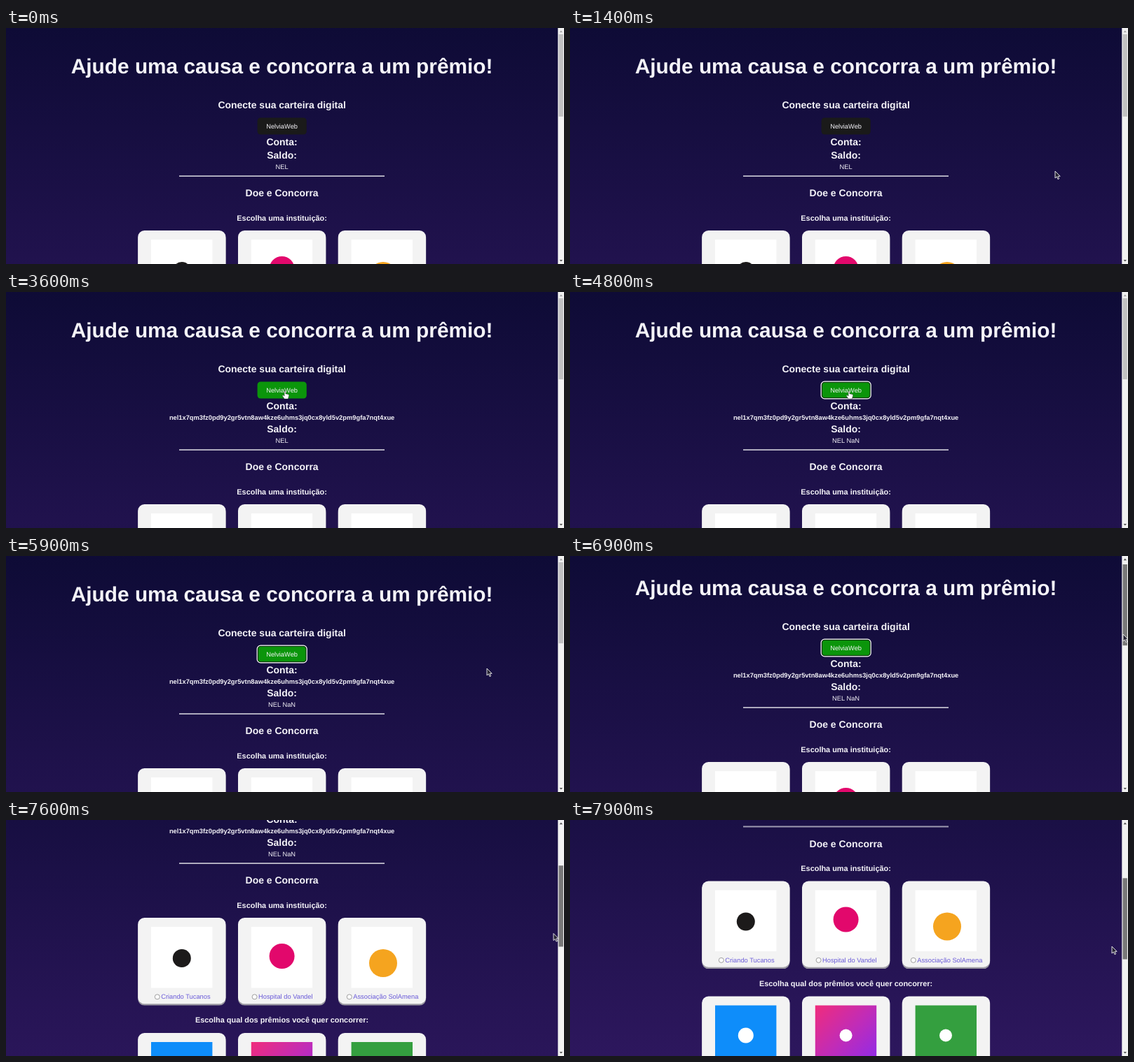
An HTML page for the animation above (8 s loop, 796 px wide and 338 px high).

```html
<!DOCTYPE html>
<html lang="pt-BR">
<head>
<meta charset="utf-8">
<title>Ajude uma causa</title>
<style>
  html, body { margin: 0; width: 100%; height: 100%; overflow: hidden; background: #0e0b36; }
  svg { display: block; width: 796px; height: 338px; }
  text { font-family: "Liberation Sans", Arial, sans-serif; fill: #f4f3f8; text-rendering: geometricPrecision; }
  .h1, .h2, .h3, .b { font-weight: bold; text-anchor: middle; }
  .h1 { font-size: 29.84px; }
  .h2 { font-size: 13.98px; }
  .h3 { font-size: 10.91px; }
  .b, .p, .label { font-size: 9.32px; }
  .p { text-anchor: middle; }
  .label { fill: #6a5bd8; }
</style>
</head>
<body>
<svg viewBox="0 0 796 338">
  <defs>
    <linearGradient id="night" x2="0" y2="1">
      <stop stop-color="#0e0b36"/><stop offset="1" stop-color="#421f78"/>
    </linearGradient>
    <linearGradient id="pink" x2="1" y2="1">
      <stop stop-color="#f02c7c"/><stop offset=".5" stop-color="#c02cb8"/><stop offset="1" stop-color="#8a2bee"/>
    </linearGradient>
  </defs>

  <g id="page">
    <rect width="788" height="931" fill="url(#night)"/>
    <text class="h1" x="393.6" y="65">Ajude uma causa e concorra a um prêmio!</text>
    <text class="h2" x="393.6" y="115">Conecte sua carteira digital</text>
    <rect id="button" x="358.6" y="128.5" width="70.2" height="24" rx="4.6"/>
    <rect id="border" x="359.2" y="129.1" width="69" height="22.8" rx="4.2" fill="none" stroke="#fff" stroke-width="1.3"/>
    <g id="ring" fill="none">
      <rect x="359.3" y="129.2" width="68.8" height="22.6" rx="4" stroke="#101010" stroke-width="1"/>
      <rect x="358.2" y="128.1" width="71" height="24.8" rx="5" stroke="#fff" stroke-width="1.2"/>
    </g>
    <text class="p" x="393.6" y="143.6">NelviaWeb</text>
    <text class="h2" x="393.6" y="167.5">Conta:</text>
    <text class="b" id="account" x="393.6" y="182.5">nel1x7qm3fz0pd9y2gr5vtn8aw4kze6uhms3jq0cx8yld5v2pm9gfa7nqt4xue</text>
    <g id="lower">
      <text class="h2" x="393.6" y="201">Saldo:</text>
      <text class="p" id="balance" x="393.6" y="216.4"></text>
      <rect x="247" y="225" width="293" height="1" fill="#9d9ab0"/>
      <rect x="247" y="226" width="293" height=".8" fill="#e6e5ec"/>
      <text class="h2" x="393.6" y="255">Doe e Concorra</text>
      <text class="h3" x="393.6" y="289.8">Escolha uma instituição:</text>
      <text class="h3" x="393.6" y="454.3">Escolha qual dos prêmios você quer concorrer:</text>
      <g id="cards"></g>
    </g>
  </g>

  <rect x="787.3" width="9" height="338" fill="#f1f1f1"/>
  <path id="up" d="M789.6 6.2h4.4l-2.2-2.6z"/>
  <path d="M789.6 332h4.4l-2.2 2.6z" fill="#505050"/>
  <rect id="thumb" x="788.5" width="6.4"/>

  <path id="arrow" d="M0 0V10L2.4 7.9 4 11.6 5.7 10.9 4.1 7.3H7.2Z" fill="#262433" stroke="#f2f2f2" stroke-width=".9" stroke-linejoin="round"/>
  <path id="hand" d="M-.9.8Q0-.5.9.8V4.2L4.6 5Q5.9 5.4 5.7 6.9L5 9.2 4.4 11.6H-.8L-3.6 7.4Q-3.9 6 -2.6 6.2L-.9 7.4Z" fill="#fff" stroke="#333" stroke-width=".5" stroke-linejoin="round"/>
</svg>

<script>
const LOOP = 8000, STEP = 100;
const $ = id => document.getElementById(id);
const set = (el, attrs) => { for (const k in attrs) el.setAttribute(k, attrs[k]); };

function add(name, attrs, text) {
  const el = document.createElementNS("http://www.w3.org/2000/svg", name);
  set(el, attrs);
  if (text) el.textContent = text;
  $("cards").append(el);
}

// tile colour, emblem [colour, x, y, r], label, label x
const cards = [
  ["#fff", ["#1c1a1a", 250.8, 362, 13], "Criando Tucanos", 221.2],
  ["#fff", ["#e2086c", 393.6, 359, 18], "Hospital do Vandel", 360],
  ["#fff", ["#f5a41f", 538, 369, 20], "Associação SolAmena", 495.2],
  ["#0e8dfa", ["#fff", 250.8, 525, 11]],
  ["url(#pink)", ["#fff", 393.6, 525, 9]],
  ["#349f3f", ["#fff", 536, 525, 9]]
];

cards.forEach(([tile, [fill, cx, cy, r], label, labelX], i) => {
  const x = 188.2 + (i % 3) * 142.8, y = i < 3 ? 304.1 : 469;
  const body = { x, width: 125.3, height: 123.2, rx: 9.3 };
  add("rect", { ...body, y: y + 2.3, fill: "#9c9aa3" });
  add("rect", { ...body, y, fill: "#f3f3f3" });
  add("rect", { x: x + 18.8, y: y + 13, width: 87.4, height: 87.4, fill: tile });
  add("circle", { cx, cy, r, fill });
  if (!label) return;
  add("circle", { cx: labelX - 5.4, cy: y + 113.2, r: 3.5, fill: "#fff", stroke: "#767676", "stroke-width": .7 });
  add("text", { class: "label", x: labelX, y: y + 116.2 }, label);
});

// time, x, y of the pointer tip
const pointer = [
  [1200, 776, 215], [1500, 650, 200], [1800, 475, 180], [2000, 425, 171],
  [2200, 408, 154], [2500, 398, 141.5], [4800, 398, 141.5], [5200, 416, 156],
  [5600, 436, 166], [5800, 615, 163], [5900, 686, 161], [6200, 760, 130],
  [6500, 790, 108], [6700, 790, 108], [6900, 789, 112], [7000, 789, 112],
  [7300, 785, 136], [7600, 781, 162.5], [7900, 773, 181]
];
// time, scroll offset
const scrolling = [[6700, 0], [6900, 9], [7000, 9], [7100, 27], [7300, 78], [7600, 164], [7700, 184], [7900, 216.5]];

function at(keys, t) {
  const i = keys.findIndex(k => k[0] > t);
  if (i < 0) return keys[keys.length - 1].slice(1);
  if (i === 0) return keys[0].slice(1);
  const a = keys[i - 1], b = keys[i], p = (t - a[0]) / (b[0] - a[0]);
  return a.slice(1).map((v, j) => v + (b[j + 1] - v) * p);
}

function draw(time) {
  const t = Math.floor(time % LOOP / STEP) * STEP;
  const linked = t >= 2900, focused = t >= 4800;
  const [x, y] = at(pointer, t), [scroll] = at(scrolling, t);
  const over = x > 359 && x < 429 && y > 128 && y < 152.5;
  const pageHeight = linked ? 931 : 917, track = 320;

  set($("page"), { transform: `translate(0 ${-scroll})` });
  set($("lower"), { transform: `translate(0 ${linked ? 0 : -14})` });
  set($("button"), { fill: linked ? "#0b950b" : "#1a1a1a" });
  set($("border"), { opacity: linked ? 0 : Math.min(1, Math.max(0, (t - 2200) / 250)) });
  set($("ring"), { opacity: +focused });
  set($("account"), { opacity: +linked });
  $("balance").textContent = focused ? "NEL NaN" : "NEL";

  set($("up"), { fill: scroll ? "#505050" : "#a3a3a3" });
  set($("thumb"), {
    y: 8.9 + scroll * track / pageHeight,
    height: 338 * track / pageHeight,
    fill: t >= 6700 ? "#787878" : t >= 6500 ? "#a8a8a8" : "#c1c1c1"
  });

  const place = `translate(${x} ${y})`;
  set($("arrow"), { transform: place, opacity: +(t >= 1200 && !over) });
  set($("hand"), { transform: place, opacity: +over });
}

let start;
function tick(now) {
  start ??= now;
  draw(now - start);
  requestAnimationFrame(tick);
}
draw(0);
requestAnimationFrame(tick);
</script>
</body>
</html>
```
